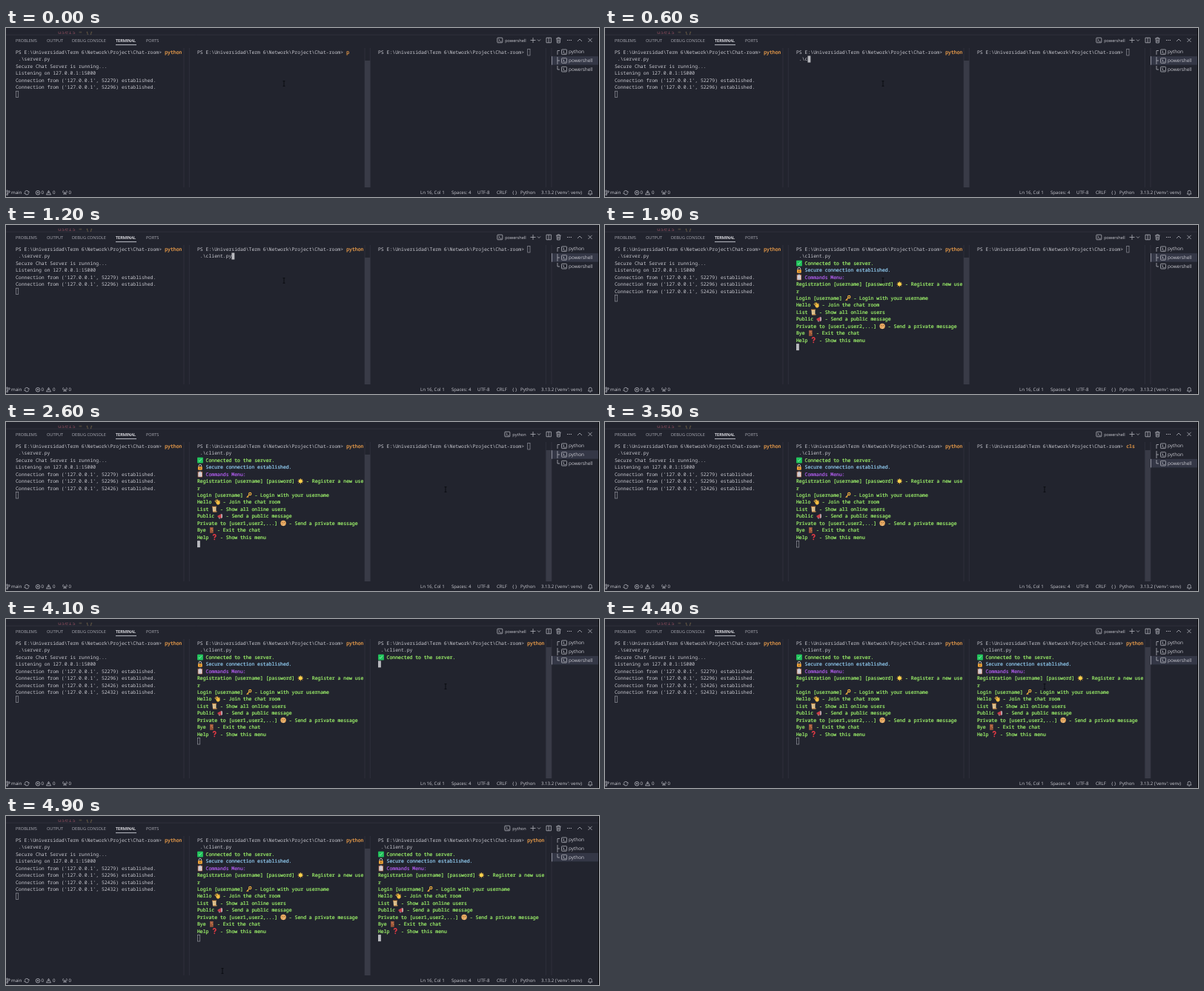
Write an HTML page that moves like this. It is 800 px wide and 228 px high and loops after 5000 ms.

```html
<!DOCTYPE html>
<html lang="en">
<head>
<meta charset="utf-8">
<title>Terminal</title>
<style>
html, body { margin: 0; width: 100%; height: 100%; overflow: hidden; background: #22242e; }
svg { display: block; width: 100vw; height: 100vh; }
text { white-space: pre; text-rendering: geometricPrecision; fill: #c9c9d0; }
.mono { font: 6.45px "Noto Sans Mono", "DejaVu Sans Mono", monospace; }
.vivid { stroke-width: .22; }
.code { font: 8px "Noto Sans Mono", monospace; }
.tab { font: 5.6px "Open Sans", "Noto Sans", sans-serif; }
.name { font: 6.4px "Open Sans", "Noto Sans", sans-serif; }
.status { font: 6.1px "Open Sans", "Noto Sans", sans-serif; }
.icon { fill: none; stroke: #b9bac2; stroke-width: .75; }
.rule { stroke: #343641; stroke-width: .7; }
</style>
</head>
<body>
<svg viewBox="0 0 800 228" preserveAspectRatio="none">
  <defs>
    <g id="term" class="icon"><rect x="-3.5" y="-3.3" width="7" height="6.6" rx=".8"/><path d="M-1.9-1.6 0 0-1.9 1.6M.3 1.8H2.2"/></g>
    <g id="ok"><rect x="-3.8" y="-3.9" width="7.8" height="7.8" rx=".8" fill="#22c45c"/><path d="M-2 .2-.7 1.6 2-1.8" fill="none" stroke="#8eeaae" stroke-width=".9"/></g>
    <g id="lock"><path d="M-1.8 0V-1.8a1.8 1.8 0 0 1 3.6 0V0" fill="none" stroke="#c9c2b8" stroke-width="1"/><rect x="-2.9" y="-.8" width="5.8" height="4.6" rx=".8" fill="#f0a336"/><path d="M0 .7V2.2" stroke="#5b3b18"/></g>
    <g id="clip"><rect x="-3.2" y="-3.6" width="6.4" height="7.6" rx=".7" fill="#a8674a"/><rect x="-2.4" y="-2.5" width="4.8" height="5.8" fill="#e4dfe4"/><rect x="-1.3" y="-4" width="2.6" height="1.6" fill="#9a9aa4"/><path d="M-1.5-.8H1.5M-1.5.7H1.5M-1.5 2.1H1" stroke="#9b98a5" stroke-width=".5"/></g>
    <g id="star"><path d="M0-3.8V3.8M-3.8 0H3.8M-2.7-2.7 2.7 2.7M2.7-2.7-2.7 2.7" stroke="#d9a640" stroke-width=".9"/><circle r="2.5" fill="#f9d14c"/></g>
    <g id="key" fill="none" stroke="#f0b040" stroke-width="1.2"><circle cx="1.6" cy="-1.7" r="1.6"/><path d="M.5-.5-3 3.2M-1.6 1.7-.5 2.8"/></g>
    <g id="hand"><path d="M-3-1.6-.4 1M-1.8-3 .7-.2M0-3.3 1.8-.5M2.8-2.2V1" stroke="#f5bd42" stroke-width="1.1" stroke-linecap="round"/><circle cx="1" cy="1.2" r="2.4" fill="#f5bd42"/></g>
    <g id="scroll"><path d="M-2.8-3.6H2.2V3.6H-2.2Z" fill="#e9cf9c"/><path d="M-3.2-3.2H2.6M-1.8 3.3H3.4" stroke="#c78a48" stroke-width="1.2"/><path d="M-1.5-1H1.2M-1.5.8H1.2" stroke="#a87b48" stroke-width=".5"/></g>
    <g id="horn"><path d="M-3.4-.6 1.8-3.2V3.2L-3.4 1.2Z" fill="#c93f4a"/><path d="M1.4-3.2 2.9-2.2V2L1.4 3Z" fill="#cfc6cc"/><path d="M-1.6 1.8-.8 3.6" stroke="#cfc6cc"/></g>
    <g id="face"><circle r="3.7" fill="#e9ab62"/><path d="M-1.8-1H-.8M.8-1H1.8M-.8 1.4H.8" stroke="#7a4526" stroke-width=".8"/><path d="M.2 1V3.6" stroke="#f6d29a" stroke-width="1"/></g>
    <g id="door"><rect x="-2.3" y="-3.9" width="4.6" height="7.8" fill="#9a5539"/><rect x="-1.4" y="-2.9" width="2.8" height="2.5" fill="#b86d4b"/><circle cx="1.4" cy=".5" r=".5" fill="#f0c45a"/></g>
    <g id="ask"><path d="M-1.8-1.8a1.8 1.7 0 1 1 2.6 1.5Q0 .2 0 1.3" fill="none" stroke="#e83a45" stroke-width="1.5"/><circle cy="3" r=".9" fill="#e83a45"/></g>
  </defs>

  <g opacity=".5">
    <text class="code" x="70" y="7.6" style="fill:#d76a80">users</text>
    <text class="code" x="98" y="7.6" style="fill:#d5b46a">= {}</text>
  </g>
  <rect width="800" height="4.8" fill="#22242e"/>
  <path class="rule" d="M0 9.2H800"/>
  <g id="labels"></g>
  <path d="M148 22.7H176" stroke="#d4d5de" stroke-width=".9"/>

  <g class="icon">
    <path d="M707.5 16.5H714.5M711 13V20M717 15.5 719 17.5 721 15.5"/>
    <path d="M729 13.2H735.4V19.8H729ZM732.2 13.2V19.8"/>
    <path d="M742.2 14H748.6M744.2 14V13H746.6V14M743 14 743.5 20H747.3L747.8 14M744.8 15.5V18.6M746 15.5V18.6"/>
    <path d="M757 16.5H758.2M759.4 16.5H760.6M761.8 16.5H763" stroke-width="1.1"/>
    <path d="M771 18 774 15 777 18M785.4 13.8 790.6 19M790.6 13.8 785.4 19"/>
    <circle cx="1.6" cy="219.8" r=".9"/><circle cx="1.6" cy="224.8" r=".9"/><circle cx="4.4" cy="220.6" r=".9"/>
    <path d="M1.6 220.7V223.9M4.4 221.5Q4.2 223 1.8 223.2"/>
    <path d="M25.3 221.6A2.8 2.8 0 0 1 30.6 221M30.8 222.6A2.8 2.8 0 0 1 25.5 223.2M29.2 221.2H31.8M24.2 223H26.8"/>
    <circle cx="43" cy="222.2" r="2.8"/><path d="M41.8 221 44.2 223.4M44.2 221 41.8 223.4"/>
    <path d="M57.5 219.3 60.5 224.8H54.5ZM57.5 221V223.2"/>
    <path d="M79.5 221 77.8 225M79.5 221 81.2 225M78.3 223.7H80.7M77.4 219.2Q76 221 77.4 222.8M81.6 219.2Q83 221 81.6 222.8"/>
    <path d="M785.4 224H791L790.2 222.6V221.2a2 2 0 0 0-4 0V222.6ZM787.4 225.2H789"/>
  </g>
  <path class="rule" d="M240 27V215M247.3 27V215M484 27V215M491.3 27V215M728.3 27V215M736 27V215"/>
  <g id="live"></g>
  <rect x="799" width="1" height="228" fill="#08090c"/>
</svg>
<script>
const COL = 3.87, ROW = 9.43, TOP = 32.7, LOOP = 5000;
const PANES = [13, 258, 502];
const PROMPT = "PS E:\\Universidad\\Term 6\\Network\\Project\\Chat-room> ";
const CLIENT = "python .\\client.py";
const GREY = "#c9c9d0", GREEN = "#9cf06a", ORANGE = "#f0a04b";

// "~" marks a two-column emoji
const MENU = [
  ["~ Connected to the server.", "ok", GREEN],
  ["~ Secure connection established.", "lock", "#8fc9ee"],
  ["~ Commands Menu:", "clip", "#ac5ce8"],
  ["Registration [username] [password] ~ - Register a new use", "star", GREEN],
  ["r", "", GREEN],
  ["Login [username] ~ - Login with your username", "key", GREEN],
  ["Hello ~ - Join the chat room", "hand", GREEN],
  ["List ~ - Show all online users", "scroll", GREEN],
  ["Public ~ - Send a public message", "horn", GREEN],
  ["Private to [user1,user2,...] ~ - Send a private message", "face", GREEN],
  ["Bye ~ - Exit the chat", "door", GREEN],
  ["Help ~ - Show this menu", "ask", GREEN]
];

const label = (cls, x, y, s, extra = "") => `<text class="${cls}" x="${x}" y="${y}" ${extra}>${s}</text>`;
const use = (id, x, y) => `<use href="#${id}" x="${x}" y="${y}"/>`;
const rect = (x, y, w, h, attrs) => `<rect x="${x}" y="${y}" width="${w}" height="${h}" ${attrs}/>`;

function put(pane, row, col, s, color) {
  const style = color ? `style="fill:${color};stroke:${color}"` : "";
  return s && label(color ? "mono vivid" : "mono", PANES[pane] + col * COL, TOP + 2.3 + row * ROW, s, style);
}

function line(pane, row, [s, emoji, color]) {
  const i = s.indexOf("~");
  if (i < 0) return put(pane, row, 0, s, color);
  return put(pane, row, 0, s.slice(0, i), color) +
    use(emoji, PANES[pane] + (i + 1) * COL, TOP + row * ROW) +
    put(pane, row, i + 2, s.slice(i + 1), color);
}

function prompt(pane, cmd) {
  return put(pane, 0, 0, PROMPT) + put(pane, 0, 52, cmd.slice(0, 6), ORANGE) + put(pane, 1, 0, cmd.slice(6));
}

function cursor(pane, row, col, focused, t) {
  const x = PANES[pane] + col * COL, y = TOP - 4.6 + row * ROW;
  if (!focused) return rect(x + .5, y + .5, COL - .6, 8.4, 'fill="none" stroke="#a3a4ad" stroke-width=".6"');
  return t % 875 < 140 ? "" : rect(x, y, COL, 9, 'fill="#b9babf"');
}

function client(pane, cmd, entered, lines, focused, t) {
  const n = cmd.length;
  const at = entered ? [2 + lines, 0] : n >= 6 ? [1, n - 6] : [0, 52 + n];
  return prompt(pane, cmd) + MENU.slice(0, lines).map((m, i) => line(pane, 2 + i, m)).join("") +
    cursor(pane, ...at, focused, t);
}

function server(t) {
  const ports = [52279, 52296];
  if (t >= 1500) ports.push(52426);
  if (t >= 4000) ports.push(52432);
  const out = ["Secure Chat Server is running...", "Listening on 127.0.0.1:15000",
    ...ports.map(p => `Connection from ('127.0.0.1', ${p}) established.`)];
  return prompt(0, "python .\\server.py") + out.map((s, i) => put(0, 2 + i, 0, s)).join("") +
    cursor(0, 2 + out.length, 0, false, t);
}

const linesAt = (t, connect, menu) => t < connect ? 0 : t < menu ? 1 : MENU.length;

function thirdCommand(t) {
  if (t < 3600) return "cls".slice(0, Math.max(0, Math.floor((t - 2900) / 200)));
  return t < 3700 ? "" : CLIENT;
}

function mouseAt(t) {
  const path = [[0, 375, 75], [2100, 375, 75], [2500, 593, 91], [4500, 593, 91], [4900, 292, 209], [LOOP, 292, 209]];
  const i = path.findIndex(p => p[0] > t), [t0, x0, y0] = path[i - 1], [t1, x1, y1] = path[i];
  const k = (t - t0) / (t1 - t0), e = k * k * (3 - 2 * k);
  return [x0 + (x1 - x0) * e, y0 + (y1 - y0) * e];
}

function sidebar(t, focus) {
  const names = ["python", t < 2300 ? "powershell" : "python", t < 4600 ? "powershell" : "python"];
  const trees = ["M747 30.5H744V36", "M744 39V49M744 44H747", "M744 51V56H747"];
  const width = names[focus] === "python" ? 19 : 29, y = 38.2 + (focus - 1) * 11.7;
  return rect(736, y, 63, 11.5, 'fill="#343746"') + rect(736, y, 1, 11.5, 'fill="#8d8f9c"') +
    names.map((s, i) => use("term", 753, 32.3 + i * 11.7) + label("name", 759, 34.4 + i * 11.7, s)).join("") +
    `<path class="icon" d="${trees.join("")}"/>` +
    use("term", 695.3 - width, 16.5) + label("tab", 701.7, 18.6, names[focus], 'text-anchor="end"');
}

// A scrollbar shows while its pane is hovered; the middle one also while focused
function sliders(mx, focus) {
  const bar = (x, y) => rect(x, y, 7.3, 215 - y, 'fill="#393b47"');
  return (mx < 491 || focus === 1 ? bar(484, 44) : "") + (mx >= 491 ? bar(728.6, 38) : "");
}

function scene(t) {
  const focus = t < 2800 ? 1 : 2, [mx, my] = mouseAt(t);
  return sliders(mx, focus) + server(t) +
    client(1, CLIENT.slice(0, 1 + Math.floor(t / 65)), t >= 1300, linesAt(t, 1500, 1800), focus === 1, t) +
    client(2, thirdCommand(t), t >= 3800, linesAt(t, 4000, 4400), focus === 2, t) +
    sidebar(t, focus) +
    `<path transform="translate(${mx} ${my})" d="M-1.5-3.4H1.5M0-3.4V3.4M-1.5 3.4H1.5" stroke="#0b0c11" stroke-width=".9"/>`;
}

const tabs = [[13, "PROBLEMS"], [55, "OUTPUT"], [89, "DEBUG CONSOLE"], [148, "TERMINAL"], [189, "PORTS"]];
const status = [[7, "main"], [47.5, "0"], [63, "0"], [84.5, "0"], [559, "Ln 16, Col 1"], [601, "Spaces: 4"],
  [636, "UTF-8"], [662, "CRLF"], [683, "{ }"], [694, "Python"], [722, "3.13.2 ('venv': venv)"]];
const active = 'style="fill:#f0f0f5;stroke:#f0f0f5;stroke-width:.15"';
document.getElementById("labels").innerHTML =
  tabs.map(([x, s]) => label("tab", x, 18.6, s, s === "TERMINAL" ? active : 'style="fill:#a8a9b2"')).join("") +
  status.map(([x, s]) => label("status", x, 224.4, s)).join("");

const live = document.getElementById("live");
let shown = -1;
function frame() {
  const t = Math.floor(performance.now() % LOOP / 100) * 100;
  if (t !== shown) live.innerHTML = scene(shown = t);
  requestAnimationFrame(frame);
}
frame();
</script>
</body>
</html>
```
